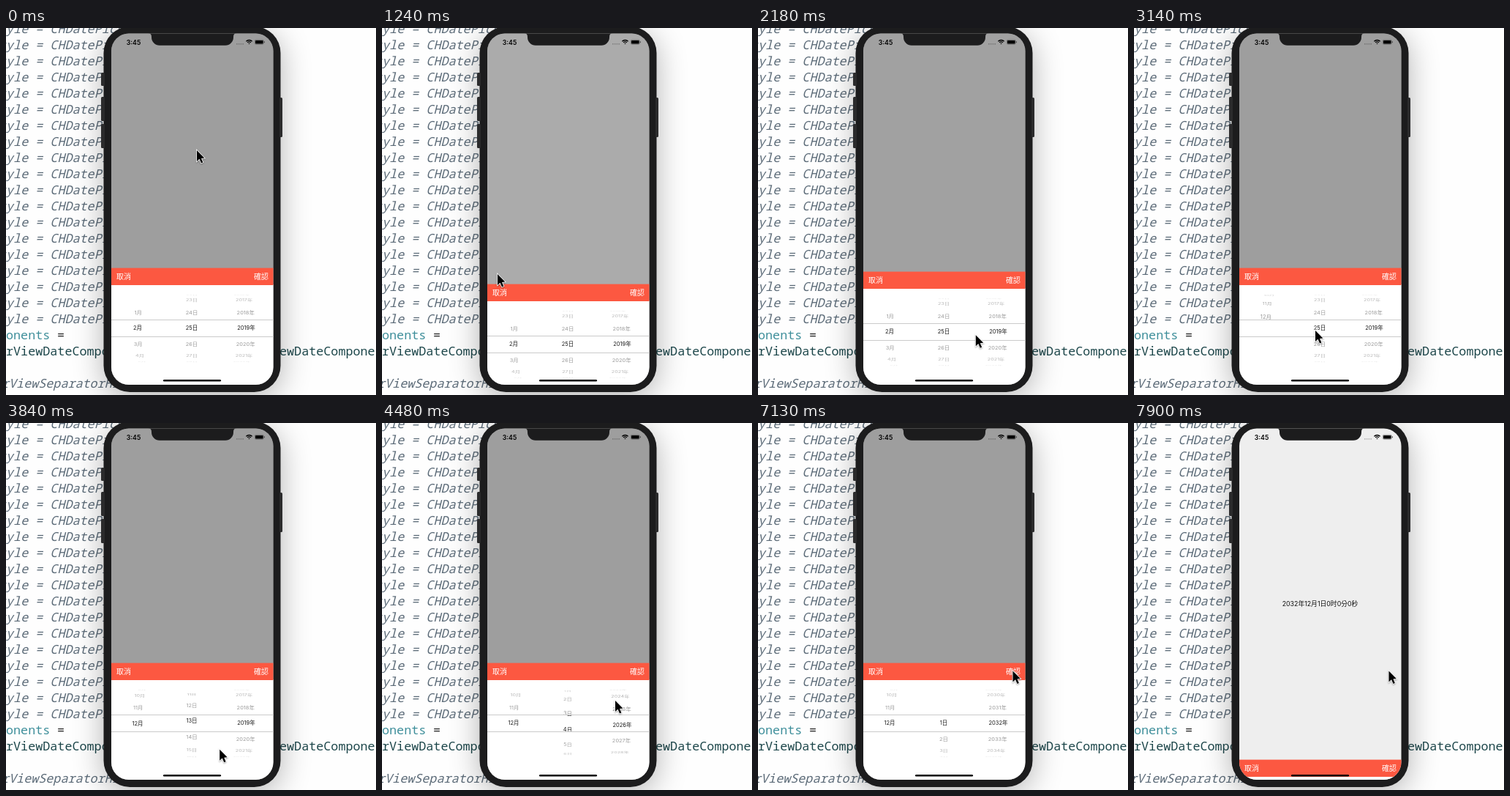
These frames come from a looping animation (506x501 px, 7990 ms). An HTML page with a canvas:

```html
<!DOCTYPE html>
<html lang="zh-Hant">
<head>
<meta charset="utf-8">
<style>
html, body { margin: 0; width: 100%; height: 100%; overflow: hidden; background: #fefefe; }
canvas { display: block; }
</style>
</head>
<body>
<canvas id="stage" width="506" height="501"></canvas>
<script>
const c = document.getElementById('stage').getContext('2d');
const LOOP = 7990;
const SANS = 'Inter, "Noto Sans CJK TC", "Noto Sans CJK SC", "Noto Sans CJK JP", sans-serif';
const MONO = '"Noto Sans Mono", "DejaVu Sans Mono", monospace';
const MID = 410, RADIUS = 46, STEP = 0.487, SLIDE = 159;
const CLOSE = 1240, OPEN = 2000, CONFIRM = 7810;

// Stops of the pointer: time, x, y
const stops = [
  [360, 261, 167], [840, 205, 384], [1060, 158, 336], [CLOSE, 158, 336],
  [1490, 347, 407], [OPEN, 347, 407], [2500, 182, 448], [2760, 187, 396],
  [3140, 248, 413], [3600, 270, 450], [4100, 317, 441], [4480, 319, 379],
  [5420, 332, 365], [6070, 348.5, 338.5]
];

function pointer(t) {
  const i = stops.findIndex(s => s[0] > t);
  if (i < 1) return stops.at(i).slice(1);
  const [t0, x0, y0] = stops[i - 1], [t1, x1, y1] = stops[i];
  let u = (t - t0) / (t1 - t0);
  u *= u * (3 - 2 * u);
  return [x0 + (x1 - x0) * u, y0 + (y1 - y0) * u];
}

// A flicked wheel slows down exponentially towards its end value.
function flick(t, start, from, to, tau) {
  if (t < start) return from;
  const left = (from - to) * Math.exp(-(t - start) / tau);
  return Math.abs(left) < 0.05 ? to : to + left;
}

// A wheel thrown against its end overshoots once and springs back.
function spring(t, start, from, to, peak) {
  const s = Math.max(0, t - start) * Math.PI / peak, damp = 0.846;
  return to + (from - to) * Math.exp(-damp * s) * (Math.cos(s) + damp * Math.sin(s));
}

// Share of the picker that is hidden: 0 open, 1 closed.
function hidden(t) {
  const rest = start => Math.exp(-(t - start + 7) / 55);
  if (t < CLOSE) return 0;
  if (t < OPEN) return 1 - rest(CLOSE);
  return t < CONFIRM ? rest(OPEN) : 1 - rest(CONFIRM);
}

function box(x, y, w, h, r, color) {
  c.fillStyle = color;
  c.beginPath();
  c.roundRect(x, y, w, h, r);
  c.fill();
}

function write(text, x, y, font, color, align = 'left', base = 'alphabetic') {
  c.font = font;
  c.fillStyle = color;
  c.textAlign = align;
  c.textBaseline = base;
  c.fillText(text, x, y);
}

function drawCode() {
  const plain = '16.75px ' + MONO, slanted = 'italic ' + plain;
  for (let y = 7; y < 410; y += 22) write('tyle = CHDatePicker', -10, y, slanted, '#5d6c79');
  write('onents', 0, 425, plain, '#3f8f9b');
  write('=', 70, 425, plain, '#222');
  write('rViewDateCompon', 0, 447, plain, '#1c464a');
  write('ewDateCompone', 374, 447, plain, '#1c464a');
  write('rViewSeparatorHi', -6, 491, slanted, '#5d6c79');
}

function drawBody() {
  c.save();
  c.shadowColor = 'rgba(0,0,0,.3)';
  c.shadowBlur = 42;
  c.shadowOffsetY = 8;
  box(133.5, -2, 242, 499, 36, '#1c1c1d');
  c.restore();
  box(130, 61, 5, 18, 1.5, '#2b2b2c');
  for (const y of [94, 131]) box(130, y, 5, 33, 1.5, '#2b2b2c');
  box(374, 95, 4, 54, 1.5, '#2b2b2c');
}

function drawStatus() {
  c.fillStyle = '#1c1c1d';
  c.beginPath();
  c.moveTo(194, 7);
  c.quadraticCurveTo(199, 7, 199, 12);
  c.arcTo(199, 23.7, 211, 23.7, 11);
  c.arcTo(311, 23.7, 311, 12, 11);
  c.lineTo(311, 12);
  c.quadraticCurveTo(311, 7, 316, 7);
  c.fill();
  write('3:45', 174.5, 20.3, '600 8.7px ' + SANS, '#000', 'center', 'middle');
  c.fillStyle = 'rgba(0,0,0,.25)';
  for (let i = 0; i < 4; i++) c.fillRect(315 + i * 2.8, 21, 1.6, 1.6);
  c.strokeStyle = '#000';
  c.lineWidth = 1.3;
  for (const r of [1, 3.4, 5.8]) {
    c.beginPath();
    c.arc(332.5, 22.3, r, -Math.PI * 0.75, -Math.PI * 0.25);
    c.stroke();
  }
  c.lineWidth = 0.5;
  c.strokeStyle = '#444';
  c.beginPath();
  c.roundRect(340.2, 16.2, 12.2, 6, 1.8);
  c.stroke();
  box(341, 17, 10.6, 4.4, 1, '#000');
  box(353, 18.2, 0.9, 2, 0.4, '#444');
}

function drawWheel(x, pos, first, last, unit, faded) {
  const from = Math.max(first, Math.ceil(pos - 3)), to = Math.min(last, Math.floor(pos + 3));
  for (let n = from; n <= to; n++) {
    const angle = (n - pos) * STEP, depth = Math.cos(angle), size = 1 - 0.09 * (1 - depth);
    c.save();
    c.translate(254, MID + RADIUS * Math.sin(angle));
    c.scale(size, Math.max(depth, 0.08));
    c.globalAlpha = faded ? 0.1 + 0.34 * depth : 0.9;
    write(n + unit, x - 254, 0.2, '7.5px ' + SANS, '#000', 'center', 'middle');
    c.restore();
  }
}

function drawPicker(t) {
  const wheels = [
    [180, spring(t, 2560, 2, 12, 550), 1, 12, '月'],
    [254, flick(t, 3558, 25, 1, 415), 1, 31, '日'],
    [328.5, flick(t, 4148, 2019, 2032, 443), 1970, 2100, '年']
  ];
  c.fillStyle = '#fff';
  c.fillRect(144, 350, 222, 140);
  c.fillStyle = '#fc5841';
  c.fillRect(144, 327.6, 222, 23.4);
  write('取消', 151, 339.5, '300 10px ' + SANS, '#fff', 'left', 'middle');
  write('確認', 359, 339.5, '300 10px ' + SANS, '#fff', 'right', 'middle');
  for (const [y, h, faded] of [[352, 46, true], [399, 22, false], [422, 46, true]]) {
    c.save();
    c.beginPath();
    c.rect(144, y, 222, h);
    c.clip();
    for (const w of wheels) drawWheel(...w, faded);
    c.restore();
  }
  c.fillStyle = '#cbcbcb';
  for (const y of [398, 421]) c.fillRect(144, y, 222, 1);
}

function drawScreen(t) {
  const off = hidden(t);
  c.save();
  c.beginPath();
  c.roundRect(144, 7.5, 221.5, 479.5, 24);
  c.clip();
  c.fillStyle = '#fefefe';
  c.fillRect(144, 7, 222, 480);
  if (t >= CONFIRM)
    write('2032年12月1日0时0分0秒', 254.5, 247.5, '8.8px ' + SANS, '#111', 'center', 'middle');
  c.fillStyle = `rgba(0,0,0,${0.38 * (1 - off)})`;
  c.fillRect(144, 7, 222, 480);
  c.save();
  c.translate(0, Math.round(SLIDE * off));
  if (off < 0.999) drawPicker(t);
  c.restore();
  drawStatus();
  box(215, 480, 79, 2.6, 1.3, '#000');
  c.restore();
}

function drawCursor(x, y) {
  const shape = [[0, 0], [0, 15], [3.5, 11.8], [6, 17.4], [8.4, 16.4], [6, 11], [10.4, 10.6]];
  c.save();
  c.translate(x, y);
  c.beginPath();
  for (const p of shape) c.lineTo(...p);
  c.closePath();
  c.shadowColor = 'rgba(0,0,0,.35)';
  c.shadowBlur = 2;
  c.shadowOffsetY = 1;
  c.lineWidth = 1.6;
  c.strokeStyle = '#fff';
  c.stroke();
  c.shadowColor = 'transparent';
  c.fillStyle = '#000';
  c.fill();
  c.restore();
}

function frame(now) {
  const t = now % LOOP;
  c.fillStyle = '#fefefe';
  c.fillRect(0, 0, 506, 501);
  drawCode();
  drawBody();
  drawScreen(t);
  drawCursor(...pointer(t));
  requestAnimationFrame(frame);
}
requestAnimationFrame(frame);
</script>
</body>
</html>
```
